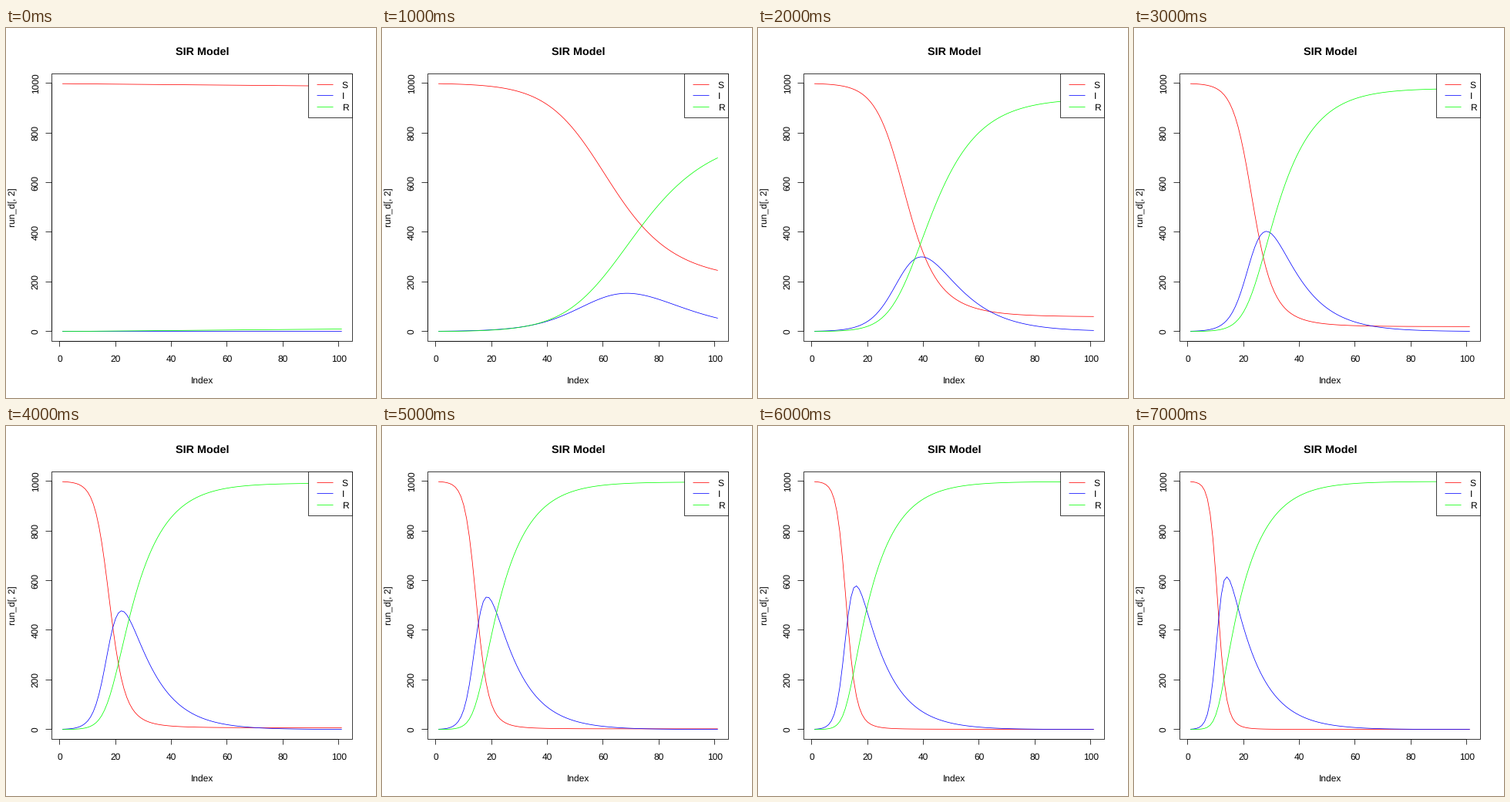
A matplotlib script that plays this animation: 480 by 480 pixels, repeating every 8000 ms.

```python
import numpy as np
import matplotlib.pyplot as plt
from matplotlib.animation import FuncAnimation
from matplotlib.patches import Rectangle

plt.rcParams.update({"font.family": "Liberation Sans", "text.hinting": "none"})

SIZE, DPI = 480, 72
LINE = 14.4                      # height of one margin line in pixels
CHAR = 10.8                      # legend character width
LEFT, RIGHT, TOP, BOTTOM = 59.04, 449.76, 59.04, 406.56
TICK = 7.2
THIN = 0.75
COLORS = ("red", "blue", "lime")
POPULATION, GAMMA, DAYS = 1000, 0.1, 100


def px(x):
    return LEFT + (x + 3) / 108 * (RIGHT - LEFT)


def py(y):
    return BOTTOM - (y + 40) / 1080 * (BOTTOM - TOP)


def rates(state, beta):
    s, i, _ = state
    infected, recovered = beta * s * i / POPULATION, GAMMA * i
    return np.array([-infected, infected - recovered, recovered])


def sir(beta, substeps=10):
    """Integrate the epidemic with RK4, one sample per day."""
    h = 1 / substeps
    state = np.array([POPULATION - 1.0, 1.0, 0.0])
    days = [state]
    for _ in range(DAYS):
        for _ in range(substeps):
            k1 = rates(state, beta)
            k2 = rates(state + h / 2 * k1, beta)
            k3 = rates(state + h / 2 * k2, beta)
            k4 = rates(state + h * k3, beta)
            state = state + h / 6 * (k1 + 2 * k2 + 2 * k3 + k4)
        days.append(state)
    return np.array(days).T


fig = plt.figure(figsize=(SIZE / DPI, SIZE / DPI), dpi=DPI, facecolor="white")
ax = fig.add_axes([0, 0, 1, 1])
ax.set(xlim=(0, SIZE), ylim=(SIZE, 0))
ax.axis("off")


def pixel(v):
    return np.floor(v) + 0.5


def stroke(xs, ys, color="black", z=1):
    """Draw a straight line centred on whole pixels."""
    ax.plot(pixel(np.array(xs)), pixel(np.array(ys)), color=color, lw=THIN,
            solid_capstyle="butt", snap=False, zorder=z)


def box(x0, y0, x1, y1, fill, z):
    x0, y0, x1, y1 = (pixel(v) for v in (x0, y0, x1, y1))
    ax.add_patch(Rectangle((x0, y0), x1 - x0, y1 - y0, fc=fill, ec="black",
                           lw=THIN, snap=False, zorder=z))


def label(x, y, text, size=12, rotation=0, ha="center", **kw):
    ax.text(x, y, text, size=size, rotation=rotation, ha=ha, va="baseline",
            rotation_mode="anchor", **kw)


def draw_axes():
    box(LEFT, TOP, RIGHT, BOTTOM, "none", 1)
    stroke([px(0), px(100)], [BOTTOM, BOTTOM])
    stroke([LEFT, LEFT], [py(0), py(1000)])
    for v in range(0, 101, 20):
        stroke([px(v)] * 2, [BOTTOM, BOTTOM + TICK])
        label(px(v), BOTTOM + 1.8 * LINE, str(v))
    for v in range(0, 1001, 200):
        stroke([LEFT - TICK, LEFT], [py(v)] * 2)
        label(LEFT - 1.2 * LINE, py(v), str(v), rotation=90)
    mid_x, mid_y = (LEFT + RIGHT) / 2, (TOP + BOTTOM) / 2
    label(mid_x, BOTTOM + 3.8 * LINE, "Index")
    label(LEFT - 3.2 * LINE, mid_y, "run_d[, 2]", rotation=90)
    label(mid_x, 34.7, "SIR Model", size=14.4, weight="bold")


def draw_legend():
    left = 392.5
    box(left, TOP, RIGHT, TOP + 4 * LINE, "white", 4)
    for row, (name, color) in enumerate(zip("SIR", COLORS), 1):
        y = TOP + row * LINE
        stroke([left + CHAR, left + 3 * CHAR], [y, y], color, 5)
        label(left + 4 * CHAR, y + 4.3, name, ha="left", zorder=5)


draw_axes()
draw_legend()
days_x = px(np.arange(1, DAYS + 2))
curves = [ax.plot([], [], color=c, lw=THIN, snap=False, zorder=3)[0]
          for c in COLORS]


def update(frame):
    for curve, values in zip(curves, sir(0.1 * (frame + 1))):
        curve.set_data(days_x, py(values))
    return curves


anim = FuncAnimation(fig, update, frames=8, interval=1000, repeat=True,
                     repeat_delay=0)
plt.show()
```
